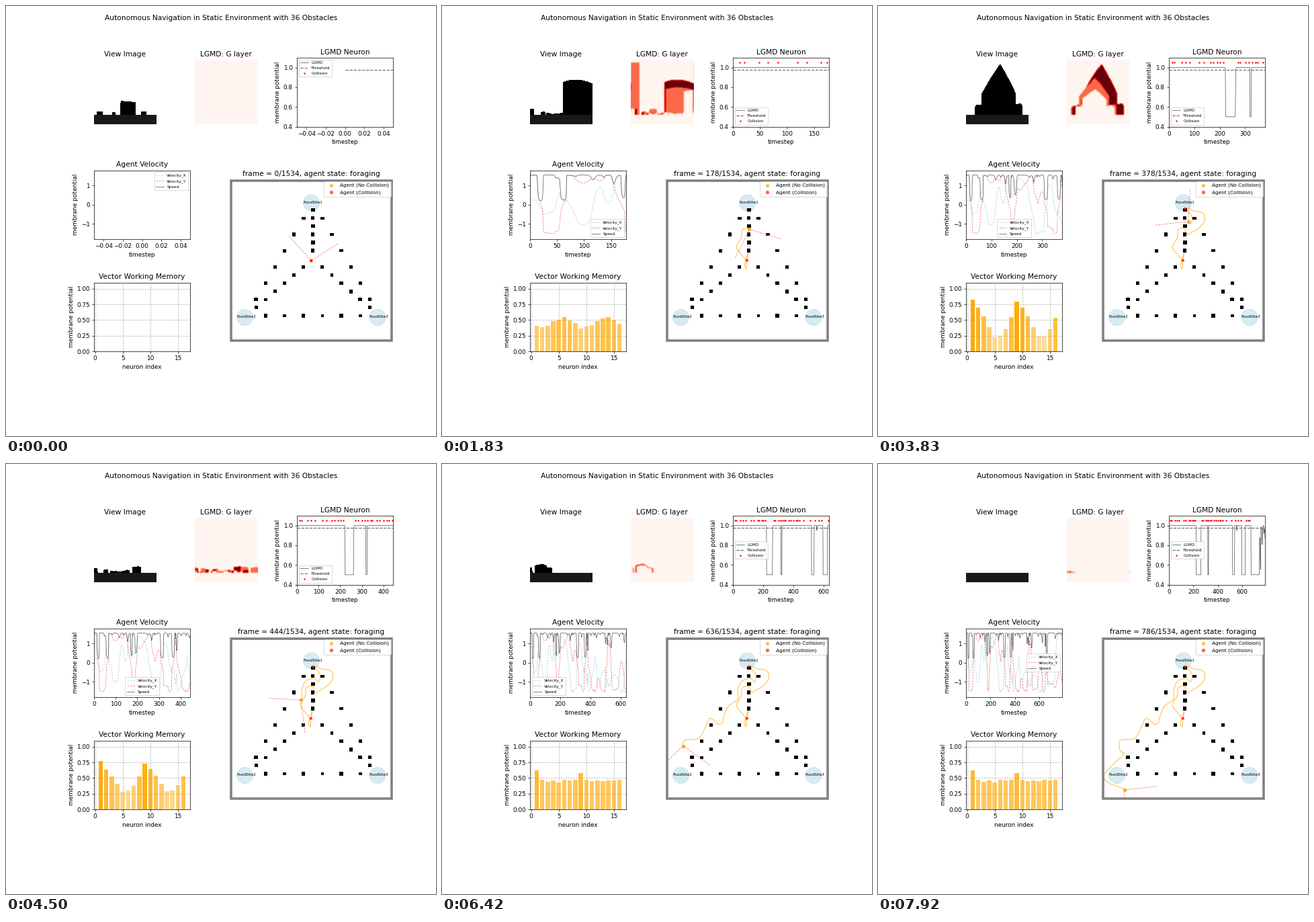
Animation, 640 px wide and 640 px high, one loop 8 s. Source, as a matplotlib script:

```python
import numpy as np
import matplotlib.pyplot as plt
from matplotlib.animation import FuncAnimation
from matplotlib.collections import PatchCollection
from matplotlib.patches import Circle, Rectangle

SIZE, STEPS = 640, 787
FRAMES, INTERVAL = 100, 80
TICK = 1000 / 12                      # the picture advances 12 times a second
HALF_VIEW, VIEW_LEN = np.radians(50), 49
COLS, ROWS, HORIZON = 93, 96, 82
LIMIT, FED = 0.98, 318                # neuron threshold, step of the first meal
rng = np.random.default_rng(4)
steps = np.arange(STEPS)

# ---- world (stage pixels, y down) ----
# grid columns filled in each row, mirrored about the middle
rows = [(0,), (0, 1), (0,), (0, 2), (0,), (0, 3), (), (1, 4), (2,),
        (3, 5), (4,), (5, 6), (6,), (1, 3, 5)]
centres = np.array([(456.8 + 14.1 * c, 303.7 + 12.1 * r) for r, cols in enumerate(rows)
                    for c in sorted({s * c for c in cols for s in (-1, 1)})])
sizes = rng.uniform(4.3, 5.8, centres.shape)
corners = centres - sizes / 2
sites = [(454.5, 293), (355.5, 463.5), (553, 463.5)]
start, meal = (454, 379), (457, 301.5)

# waypoints of each leg, keyed by the step that ends it
legs = {
    0: [start],
    178: [(455.5, 368), (450.5, 385), (453, 391), (452, 378), (438.5, 360),
          (445, 346), (447, 333.5), (455.5, 330.5), (457.5, 332.5)],
    278: [(460.5, 340), (467, 337), (478, 330), (486, 320), (485, 309.5), (478, 306)],
    378: [(470, 305), (458, 300.5), (467, 313), (465.5, 324.5), (461.6, 320.7)],
    511: [(458, 319), (446, 323.5), (440, 337), (440, 350), (426, 361),
          (419, 378), (417, 385.5), (411.3, 387.3)],
    636: [(406, 382.5), (398, 379), (390, 396), (381, 409), (366, 410),
          (359.6, 412.5), (359, 419.5)],
    786: [(360.6, 427), (366, 432), (351, 446), (336, 464), (344, 475),
          (359, 480.5), (367, 485)],
}


def smooth_curve(pts, sub=40):
    """Catmull-Rom curve through the points."""
    p = np.vstack([2 * pts[0] - pts[1], pts, pts[-1] + (2, 6)])
    u = np.linspace(0, 1, sub, endpoint=False)[:, None]
    out = [0.5 * (2 * b + (c - a) * u + (2 * a - 5 * b + 4 * c - d) * u**2
                  + (3 * b - a - 3 * c + d) * u**3)
           for a, b, c, d in zip(p, p[1:], p[2:], p[3:])]
    return np.vstack(out + [pts[-1:]])


curve = smooth_curve(np.array([p for leg in legs.values() for p in leg], float))
length = np.r_[0, np.cumsum(np.hypot(*np.diff(curve, axis=0).T))]
leg_ends = length[40 * (np.cumsum([len(leg) for leg in legs.values()]) - 1)]


def along(dist):
    return np.c_[np.interp(dist, length, curve[:, 0]), np.interp(dist, length, curve[:, 1])]


def direction(dist, reach=0.7):
    d = along(dist + reach) - along(dist - reach)
    return np.arctan2(-d[:, 1], d[:, 0])


# the agent slows down where its path bends
road = np.linspace(0, length[-1], 2400)
bend = np.abs(np.gradient(np.unwrap(direction(road)), road))
pace = 0.2 + 1.35 / (1 + (bend / 0.35) ** 2)
clock = np.cumsum(1 / pace)
step_at = np.interp(clock, np.interp(leg_ends, road, clock), list(legs))
arc = np.interp(steps, step_at, road)
pos, heading, speed = along(arc), direction(arc), np.interp(arc, road, pace)
velocity = speed * np.cos(heading), speed * np.sin(heading), speed


# ---- agent camera ----
def skyline(p, facing):
    """Obstacle height seen in each image column, one ray per column."""
    a = facing + np.linspace(HALF_VIEW, -HALF_VIEW, COLS)[:, None]
    ray = np.cos(a), -np.sin(a)
    hits_xy = [[(corners[:, k] + side * sizes[:, k] - p[k]) / ray[k] for side in (0, 1)]
               for k in (0, 1)]
    near = np.maximum(*[np.minimum(*h) for h in hits_xy])
    far = np.minimum(*[np.maximum(*h) for h in hits_xy])
    dist = np.where(far > np.maximum(near, 0), np.maximum(near, 3.2), np.inf).min(axis=1)
    return 252 / dist


tall = np.array([skyline(p, a) for p, a in zip(pos, heading)])


def silhouette(n):
    r = np.arange(ROWS)[:, None]
    return ((r >= HORIZON - tall[max(n, 0)]) & (r < HORIZON)).astype(float)


def blur(img):
    for axis in (0, 1):
        img = (np.roll(img, 1, axis) + img + np.roll(img, -1, axis)) / 3
    return img


def camera(n):
    img = 1 - silhouette(n)
    img[HORIZON:] = 0.1
    return img


def motion_layer(n):
    now = silhouette(n)
    return 0.5 * sum(blur(abs(now - silhouette(n - lag))) for lag in (2, 5))


# the neuron is a sigmoid of what moved in view, and rests at 0.5
energy = np.abs(tall[3:] - tall[:-3]).sum(axis=1)
energy = np.r_[np.full(3, 100), energy]
neuron = 1 / (1 + np.exp(-energy / 10))
hits = np.array([n for n in range(6, STEPS)
                 if energy[n] > 80 and energy[n] == energy[n - 6:n + 7].max()])

# ---- working memory ----
cells = np.arange(1, 17)
uneven = rng.uniform(-0.03, 0.03, 16)


def memory(n):
    """A wave over the cells that flips at the meal, then fades."""
    fed = np.clip((n - FED) / 60, 0, 1)
    fade = np.clip((n - FED - 60) / 260, 0, 1)
    swing = -0.08 + fed * (0.32 - 0.24 * fade)
    wave = 0.46 + swing * np.cos(2 * np.pi * (cells - 1.6) / 8) + uneven
    return min(n / 30, 1) * (wave + 0.14 * fed * (cells % 8 == 1))


# ---- figure ----
fig = plt.figure(figsize=(10, 10), dpi=64, facecolor="white")
fig.suptitle("Autonomous Navigation in Static Environment with 36 Obstacles")


def panel(x0, y0, x1, y1, title, xlabel=None):
    ax = fig.add_axes([x0 / SIZE, 1 - y1 / SIZE, (x1 - x0) / SIZE, (y1 - y0) / SIZE])
    ax.set_title(title)
    if xlabel:
        ax.set(xlabel=xlabel, ylabel="membrane potential")
    else:
        ax.axis("off")
    return ax


def picture(ax, cmap):
    return ax.imshow(np.zeros((ROWS, COLS)), cmap=cmap, vmin=0, vmax=1,
                     aspect="auto", interpolation="nearest")


view = picture(panel(131, 80, 224, 176, "View Image"), "gray")
layer = picture(panel(281, 80, 374, 176, "LGMD: G layer"), "Reds")

neuron_ax = panel(433, 77, 576, 179.5, "LGMD Neuron", "timestep")
neuron_ax.set_ylim(0.4, 1.1)
neuron_line, = neuron_ax.plot([], [], color="#505050", lw=0.8, label="LGMD")
limit_line, = neuron_ax.plot([], [], "--", color="#666680", lw=1.3, label="Threshold")
hit_dots, = neuron_ax.plot([], [], "o", color="red", ms=2.8, mew=0, label="Collision")
neuron_ax.legend(fontsize=6.5, loc="best")

vel_ax = panel(131, 244.5, 274, 347, "Agent Velocity", "timestep")
vel_ax.set_ylim(-1.8, 1.8)
vel_lines = [vel_ax.plot([], [], style, color=col, lw=0.9, label=name)[0]
             for style, col, name in (("--", "lightblue", "Velocity_X"),
                                      ("--", "lightcoral", "Velocity_Y"),
                                      ("-", "#686870", "Speed"))]
vel_ax.legend(fontsize=6.5, loc="best")

mem_ax = panel(131, 411.5, 274, 514, "Vector Working Memory", "neuron index")
bars = mem_ax.bar(cells, np.zeros(16), width=0.8)
mem_ax.set(xlim=(-0.19, 17.19), ylim=(0, 1.1), yticks=np.arange(0, 1.1, 0.25))
mem_ax.grid(True, ls="--")
mem_ax.set_axisbelow(True)

map_ax = panel(333, 258, 575.5, 500, "")
map_ax.set(xlim=(333, 575.5), ylim=(500, 258))
for i, (x, y) in enumerate(sites, 1):
    map_ax.add_patch(Circle((x, y), 12, fc="#d6ebf2", ec="#bcdce8", lw=0.7))
    map_ax.text(x + 2.3, y - 1, f"FoodSite{i}", fontsize=6.5, ha="center",
                va="center", zorder=6)
map_ax.add_collection(PatchCollection(
    [Rectangle(xy, w, h) for xy, (w, h) in zip(corners, sizes)],
    fc="black", ec="none", zorder=3))
map_ax.add_patch(Rectangle((334.6, 259.6), 239.2, 238.8, fill=False, ec="gray",
                           lw=4, zorder=5))
trail, = map_ax.plot([], [], color="#ffc04c", lw=1.2, zorder=2)
cone, = map_ax.plot([], [], "--", color="lightcoral", lw=0.9, zorder=4)
agent, = map_ax.plot([], [], "o", ms=6, mew=0, zorder=7)
stars, = map_ax.plot([], [], "*", color="red", ms=6, mew=0, zorder=8)
for col, name in (("#ffc04c", "Agent (No Collision)"), ("#ff6650", "Agent (Collision)")):
    map_ax.scatter([], [], c=col, s=36, lw=0, label=name)
map_ax.legend(fontsize=8.33, loc="upper right", borderaxespad=0.35).set_zorder(9)


def draw(i):
    tick = int(((i + 1) * INTERVAL - 6) / TICK)
    n = max(0, (25 * tick - 16) // 3)
    past = slice(0, n + 1)
    view.set_data(camera(n))
    layer.set_data(motion_layer(n))

    for ax in (neuron_ax, vel_ax):
        ax.set_xlim((0, n) if n else (-0.05, 0.05))
    neuron_line.set_data(steps[past], neuron[past])
    limit_line.set_data([0, max(n, 1)], [LIMIT, LIMIT])
    seen = hits[hits <= n]
    hit_dots.set_data(seen, np.full(len(seen), 1.05))
    for line, data in zip(vel_lines, velocity):
        line.set_data(steps[past], data[past])

    for bar, h in zip(bars, memory(n)):
        bar.set_height(h)
        bar.set_facecolor((1, 0.66, 0, np.clip(0.15 + 1.05 * h, 0, 1)))

    x, y = pos[n]
    trail.set_data(*pos[past].T)
    edges = heading[n] + HALF_VIEW * np.array([1, 0, -1])
    reach = VIEW_LEN * np.array([1, 0, 1])
    cone.set_data(x + reach * np.cos(edges), y - reach * np.sin(edges))
    agent.set_data([x], [y])
    agent.set_color("#ff6650" if n in hits else "#ffa726")
    stars.set_data(*zip(*([start, meal] if n >= FED else [start])))
    map_ax.set_title(f"frame = {n}/1534, agent state: foraging")
    return []


anim = FuncAnimation(fig, draw, frames=FRAMES, interval=INTERVAL,
                     repeat=True, repeat_delay=0, blit=False)
plt.show()
```
